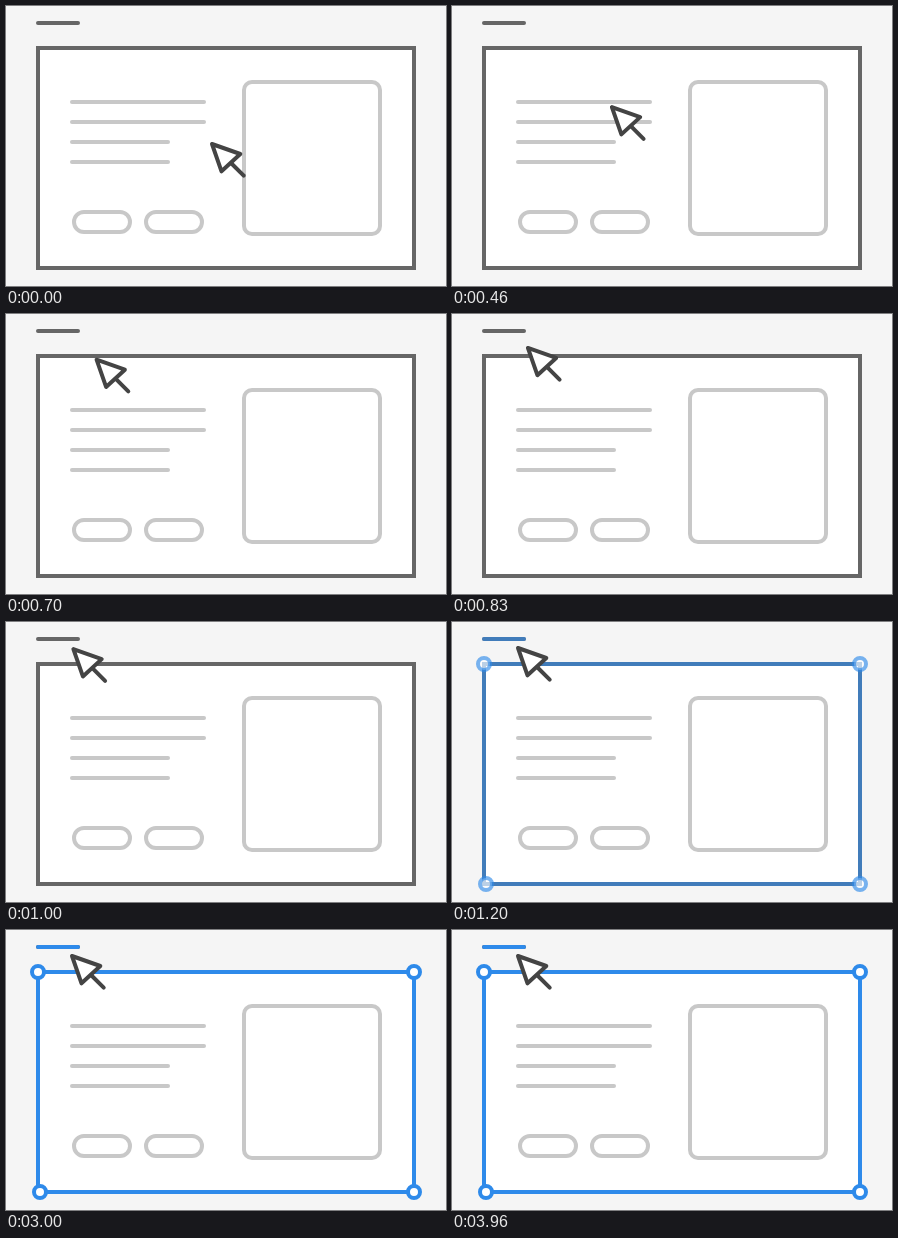
An HTML page with a canvas for the animation above (4860 ms loop, 440 by 280 pixels).

```html
<!DOCTYPE html>
<html lang="en">
<head>
<meta charset="utf-8">
<title>Selecting a frame</title>
<style>
  html, body { margin: 0; width: 100%; height: 100%; overflow: hidden; background: #f5f5f5; }
  canvas { display: block; }
</style>
</head>
<body>
<canvas id="stage" width="440" height="280"></canvas>
<script>
const ctx = document.getElementById('stage').getContext('2d');

const LOOP = 4860;
const MOVE = { start: 338, length: 780, from: [206, 138], to: [66, 26] };
const FADE = { start: 1080, length: 300 };
const DARK = '#666666', LIGHT = '#c8c8c8', BLUE = '#2e8aea', INK = '#444444';

const clamp = v => Math.min(1, Math.max(0, v));
const progress = (t, { start, length }) => clamp((t - start) / length);
const mix = (a, b, p) => a + (b - a) * p;

function cubicBezier(x1, y1, x2, y2) {
  const at = (a, b, s) => 3 * a * s * (1 - s) ** 2 + 3 * b * s * s * (1 - s) + s ** 3;
  return x => {
    let lo = 0, hi = 1;
    for (let i = 0; i < 24; i++) {
      const mid = (lo + hi) / 2;
      if (at(x1, x2, mid) < x) lo = mid; else hi = mid;
    }
    return at(y1, y2, (lo + hi) / 2);
  };
}
const glide = cubicBezier(0.2, 0.23, 0.2, 1);
const easeOut = u => 1 - (1 - u) ** 2;

function line(x1, y1, x2, y2, color) {
  ctx.strokeStyle = color;
  ctx.beginPath();
  ctx.moveTo(x1, y1);
  ctx.lineTo(x2, y2);
  ctx.stroke();
}

function box(x, y, w, h, r, color) {
  ctx.strokeStyle = color;
  ctx.beginPath();
  ctx.roundRect(x, y, w, h, r);
  ctx.stroke();
}

// Title bar and card border share one colour
function outline(color) {
  line(32, 17, 72, 17, color);
  ctx.strokeStyle = color;
  ctx.strokeRect(32, 42, 376, 220);
}

function handle(x, y) {
  ctx.fillStyle = '#ffffff';
  ctx.strokeStyle = BLUE;
  ctx.beginPath();
  ctx.arc(x, y, 6, 0, Math.PI * 2);
  ctx.fill();
  ctx.stroke();
}

function cardContent() {
  [198, 198, 162, 162].forEach((end, i) => line(66, 96 + 20 * i, end, 96 + 20 * i, LIGHT));
  box(68, 206, 56, 20, 10, LIGHT);
  box(140, 206, 56, 20, 10, LIGHT);
  box(238, 76, 136, 152, 8, LIGHT);
}

function selection(alpha) {
  if (!alpha) return;
  ctx.globalAlpha = alpha;
  outline(BLUE);
  [[32, 42], [408, 42], [34, 262], [408, 262]].forEach(([x, y]) => handle(x, y));
  ctx.globalAlpha = 1;
}

function cursor(x, y) {
  ctx.save();
  ctx.translate(x, y);
  line(19, 19, 31.7, 31.7, INK);
  ctx.fillStyle = '#ffffff';
  ctx.beginPath();
  ctx.moveTo(0, 0);
  ctx.lineTo(28.3, 10);
  ctx.lineTo(9.5, 27.3);
  ctx.closePath();
  ctx.fill();
  ctx.stroke();
  ctx.restore();
}

function draw(t) {
  ctx.fillStyle = '#f5f5f5';
  ctx.fillRect(0, 0, 440, 280);
  ctx.fillStyle = '#ffffff';
  ctx.fillRect(32, 42, 376, 220);
  ctx.lineWidth = 4;
  ctx.lineCap = 'round';
  ctx.lineJoin = 'miter';
  outline(DARK);
  cardContent();
  selection(easeOut(progress(t, FADE)));

  ctx.lineJoin = 'round';
  const p = glide(progress(t, MOVE));
  cursor(mix(MOVE.from[0], MOVE.to[0], p), mix(MOVE.from[1], MOVE.to[1], p));
}

const origin = performance.now();
function tick() {
  draw((performance.now() - origin) % LOOP);
  requestAnimationFrame(tick);
}
tick();
</script>
</body>
</html>
```
